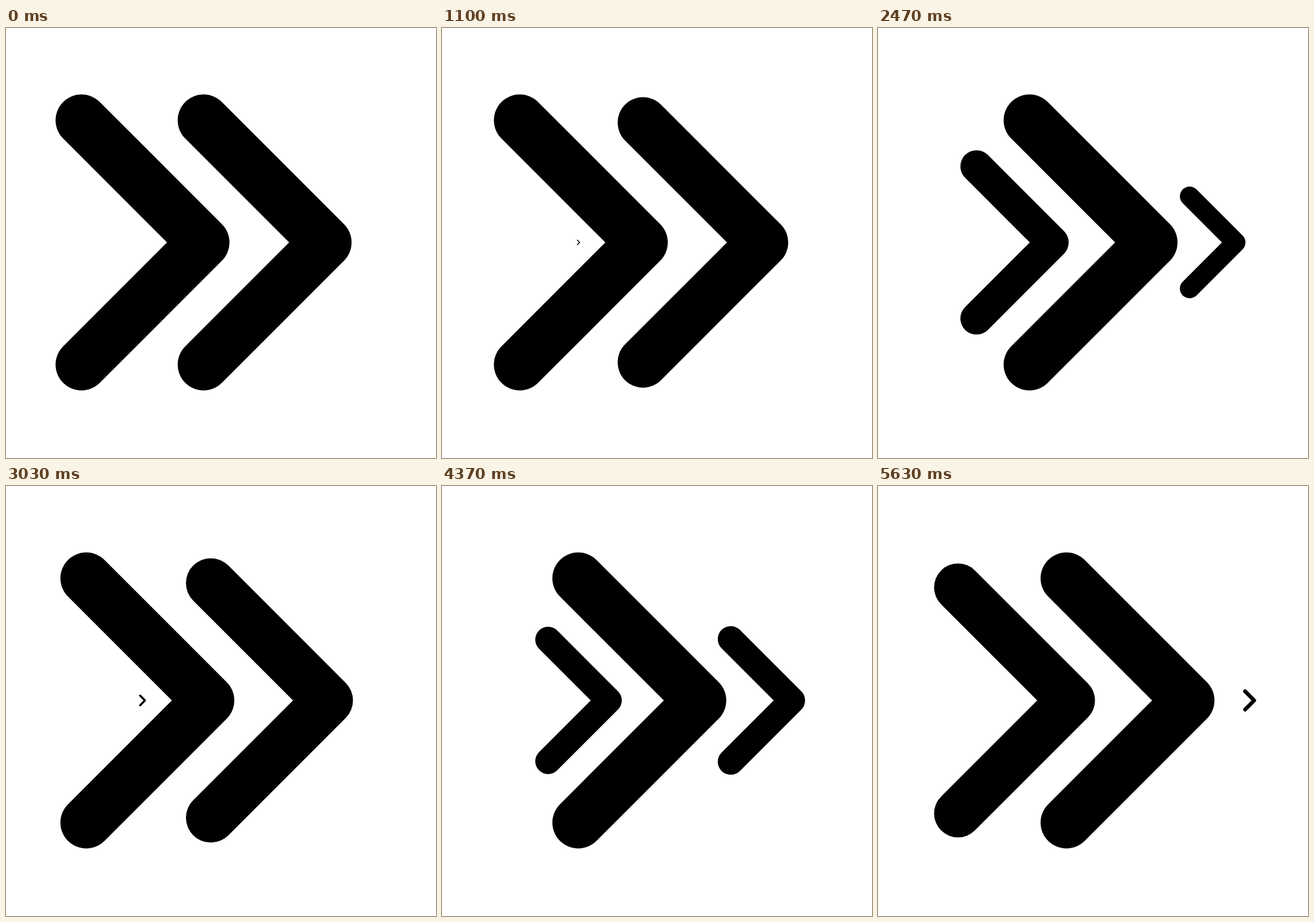
These frames come from a looping animation (748x748 px, 5660 ms). An HTML page:

```html
<!DOCTYPE html>
<html lang="en">
<head>
<meta charset="utf-8">
<title>Chevrons</title>
<style>
  html, body { margin: 0; width: 100%; height: 100%; overflow: hidden; background: #fff; }
  svg { display: block; width: 100%; height: 100%; }
</style>
</head>
<body>
<svg viewBox="0 0 748 748">
  <defs>
    <path id="chevron" d="M-106.25-212.5L106.25 0L-106.25 212.5" fill="none" stroke="#000"
      stroke-width="90" stroke-linecap="round" stroke-linejoin="round"/>
  </defs>
  <use href="#chevron"/>
  <use href="#chevron"/>
  <use href="#chevron"/>
</svg>
<script>
const LOOP = 5660, FPS = 30;
const FIRST_X = 237.5, STEP_X = 212.4, MID_Y = 373;
// Each move starts at one of these ticks, runs linearly, then rests until the next.
const STARTS = [2.6, 32.57, 59.8, 90.1, 119.65, 147.9];
const MOVE_TICKS = 22.8;
const [growing, sliding, shrinking] = document.querySelectorAll('use');

function progress(tick) {
  const start = STARTS.findLast(s => s <= tick) ?? tick;
  return Math.min((tick - start) / MOVE_TICKS, 1);
}

function place(chevron, slot, scale) {
  chevron.setAttribute('transform',
    `translate(${FIRST_X + STEP_X * slot} ${MID_Y}) scale(${scale})`);
  chevron.style.display = scale > 0 ? '' : 'none';
}

function draw(ms) {
  const p = progress(Math.floor((ms % LOOP + 3.4) * FPS / 1000));
  place(growing, 0, p);
  place(sliding, p, 1);
  place(shrinking, 1 + p, 1 - p);
}

let origin;
function frame(now) {
  origin ??= now;
  draw(now - origin);
  requestAnimationFrame(frame);
}
draw(0);
requestAnimationFrame(frame);
</script>
</body>
</html>
```
